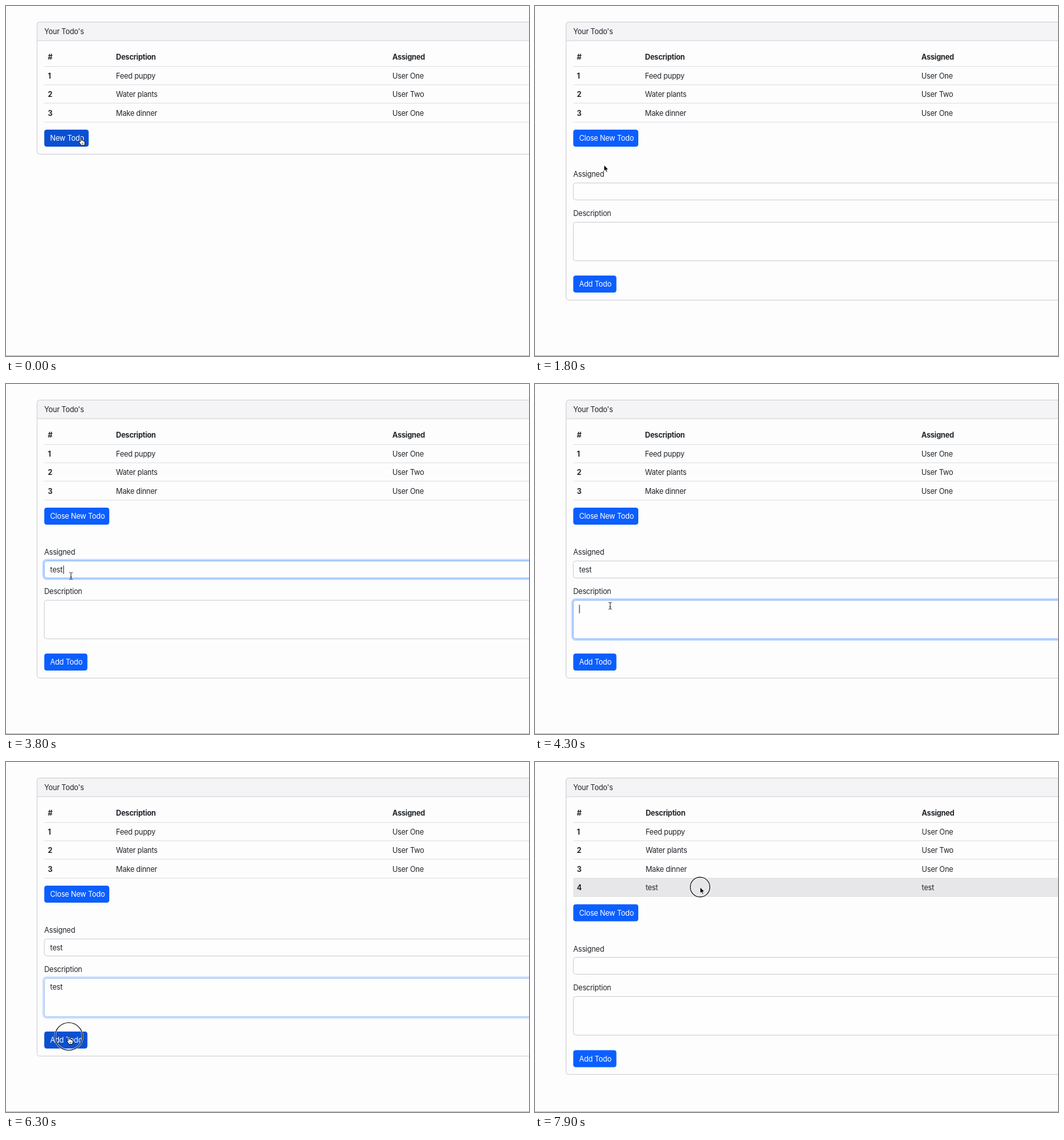
An HTML page for the animation above (8 s loop, 800 by 535 pixels).

```html
<!DOCTYPE html>
<html lang="en">
<head>
<meta charset="utf-8">
<title>Todo list</title>
<style>
  html, body { margin: 0; width: 100%; height: 100%; overflow: hidden; background: #fdfdfe; }
  svg { display: block; width: 800px; height: 535px; }
  text { font: 400 11.2px Inter, "Liberation Sans", sans-serif; letter-spacing: -.02em; fill: #212529; white-space: pre; }
  .b { font-weight: 700; }
  .w { fill: #fff; }
</style>
</head>
<body>
<svg id="stage" viewBox="0 0 800 535"></svg>
<script>
const LOOP = 8000, STEP = 100;
const OPEN = 1500, ADDED = 6500, ROW = 28.4;
const stage = document.getElementById('stage');

// time, x, y of the pointer hot spot
const path = [
  [0, 114.5, 201], [1500, 114.5, 201], [2100, 96.5, 285], [3700, 96.5, 285],
  [4100, 115, 339], [5600, 115, 339], [6200, 96, 419.5], [6500, 96, 419.5],
  [7000, 250, 201.5], [7400, 252.5, 191.2], [LOOP, 252.5, 191.2]
];
const hidden = [[3000, 3800], [4800, 5700]];
const clicks = [[1350, 1500], [2100, 2300], [4100, 4300], [6200, 6400], [7900, LOOP]];
const fields = [
  { y: 270.5, h: 26, on: 2150, off: 4150, keys: [2900, 3100, 3300, 3500] },
  { y: 330.5, h: 59, on: 4150, off: 6250, keys: [4700, 4900, 5100, 5300] }
];
const advance = [0, 4, 10.2, 16, 20];
const todos = [['Feed puppy', 'User One'], ['Water plants', 'User Two'], ['Make dinner', 'User One'], ['test', 'test']];

const clamp = v => Math.max(0, Math.min(1, v));
const within = (t, spans) => spans.find(([a, b]) => t >= a && t < b);
const mix = (a, b, k) => `rgb(${a.map((v, i) => Math.round(v + (b[i] - v) * k))})`;
const text = (x, y, s, cls = '') => `<text x="${x}" y="${y}" class="${cls}">${s}</text>`;
const line = (y, x = 58.5, color = '#dee0e3') => `<path d="M${x} ${y}H800" stroke="${color}"/>`;
const rect = (x, y, w, h, r, attrs) => `<rect x="${x}" y="${y}" width="${w}" height="${h}" rx="${r}" ${attrs}/>`;

function pointerAt(t) {
  const i = path.findIndex((p, n) => n && t <= p[0]);
  const [t0, x0, y0] = path[i - 1], [t1, x1, y1] = path[i];
  const k = clamp((t - t0) / (t1 - t0)), e = k * k * (3 - 2 * k);
  return { x: x0 + (x1 - x0) * e, y: y0 + (y1 - y0) * e };
}

const over = (p, x, y, w, h) => p.x >= x && p.x <= x + w && p.y >= y && p.y <= y + h;

function button(p, y, w, label) {
  const hot = over(p, 58.5, y, w, 26);
  if (hot) p.kind = 'hand';
  return rect(58.5, y, w, 26, 4, `fill="${hot ? '#0a50d2' : '#0b5eff'}"`) + text(67.5, y + 17.4, label, 'w');
}

function field(t, f, dy, p) {
  const y = f.y + dy;
  const glow = clamp((t - f.on) / 150) * (1 - clamp((t - f.off) / 150));
  const typed = f.keys.filter(k => t >= k);
  const n = typed.length;
  if (over(p, 58.5, y, 800, f.h)) p.kind = 'beam';
  let out = '';
  if (glow) out += rect(57, y - 1.5, 800, f.h + 3, 5, `fill="none" stroke="#0d6efd" stroke-opacity="${.27 * glow}" stroke-width="2.8"`);
  out += rect(58.5, y, 800, f.h, 4, `fill="#fefefe" stroke="${mix([206, 208, 213], [134, 178, 254], glow)}"`);
  if (t < ADDED) out += text(67.6, y + 17.3, 'test'.slice(0, n));
  const last = typed[n - 1] || f.on + 50;
  if (t >= f.on && t < f.off && Math.floor((t - last) / 500) % 2 === 0)
    out += `<path d="M${68 + advance[n]} ${y + 7}v13" stroke="#222"/>`;
  return out;
}

const cursors = {
  arrow: '<path d="M0 0V9.6L2.2 7.6L3.7 11L5.3 10.3L3.9 7.1H6.9Z" fill="#000" stroke="#fff" stroke-width=".8"/>',
  hand: '<path d="M-.9 6.2V1.2a1 1 0 0 1 2 0V4.5q1.7-.6 1.9.5q1.6-.4 1.8.7q1.4-.2 1.4 1.2V9q0 1.4-.9 3H.2q-.7-1.8-2.8-4.4q-.9-1.5.5-1.7q.7 0 1.2.9Z" fill="#fff" stroke="#000" stroke-width=".9"/><path d="M1.7 8.2v2.2M3.3 8.2v2.2" stroke="#000" stroke-width=".6"/>',
  beam: '<path d="M-2.5-5.3Q-.2-5.3 0-4Q.2-5.3 2.5-5.3M0-4V4M-2.5 5.3Q-.2 5.3 0 4Q.2 5.3 2.5 5.3M-1.2 1.6H1.2" fill="none" stroke="#222" stroke-width=".95"/>'
};

function table(t, added) {
  const x1 = added ? 169.2 : 168.3, x2 = added ? 591.6 : 591;
  let out = text(64, 82.3, '#', 'b') + text(x1, 82.3, 'Description', 'b') + text(x2, 82.3, 'Assigned', 'b') + line(92.5);
  todos.slice(0, added ? 4 : 3).forEach(([what, who], i) => {
    const y = 92.5 + ROW * i;
    if (i === 3 && t >= 7100) out += rect(58.5, y, 742, ROW, 0, 'fill="#e7e7e9"');
    out += text(64, y + 18.4, i + 1, 'b') + text(x1, y + 18.4, what) + text(x2, y + 18.4, who) + line(Math.round(y + ROW) - .5);
  });
  return out;
}

function draw(t) {
  const p = { ...pointerAt(t), kind: 'arrow' };
  const open = t >= OPEN, added = t >= ADDED, dy = added ? ROW : 0;
  const bottom = open ? 449.5 + Math.floor(dy) : 226.5;
  let out = rect(47.5, 24.5, 800, bottom - 24.5, 4, 'fill="#fdfdfe"')
    + '<path d="M47.5 53V28.5a4 4 0 0 1 4-4H800V53Z" fill="#f4f3f5"/>'
    + line(53, 47.5, '#d2d2d5')
    + rect(47.5, 24.5, 800, bottom - 24.5, 4, 'fill="none" stroke="#d0d0d4"')
    + text(58.5, 43.2, "Your Todo's")
    + table(t, added)
    + button(p, 189 + dy, open ? 99.5 : 68, open ? 'Close New Todo' : 'New Todo');
  if (open) {
    out += text(58.5, 261.2 + dy, 'Assigned') + text(58.5, 320.6 + dy, 'Description')
      + fields.map(f => field(t, f, Math.round(dy), p)).join('')
      + button(p, 412 + dy, 66, 'Add Todo');
  }
  out += line(534.5, 0, '#b9b9bc');
  const click = within(t, clicks);
  if (click) {
    const r = Math.min(21, 15 + (t - click[0]) * .12);
    const ring = (color, w) => `<circle cx="${p.x}" cy="${p.y}" r="${r}" fill="none" stroke="${color}" stroke-width="${w}"/>`;
    out += ring('rgba(255,255,255,.6)', 3) + ring('#111', 1.2);
  }
  if (!within(t, hidden)) out += `<g transform="translate(${p.x} ${p.y})">${cursors[p.kind]}</g>`;
  stage.innerHTML = out;
}

const start = performance.now();
let shown = -1;
function tick() {
  const t = Math.floor((performance.now() - start) % LOOP / STEP) * STEP;
  if (t !== shown) draw(shown = t);
  requestAnimationFrame(tick);
}
tick();
</script>
</body>
</html>
```
